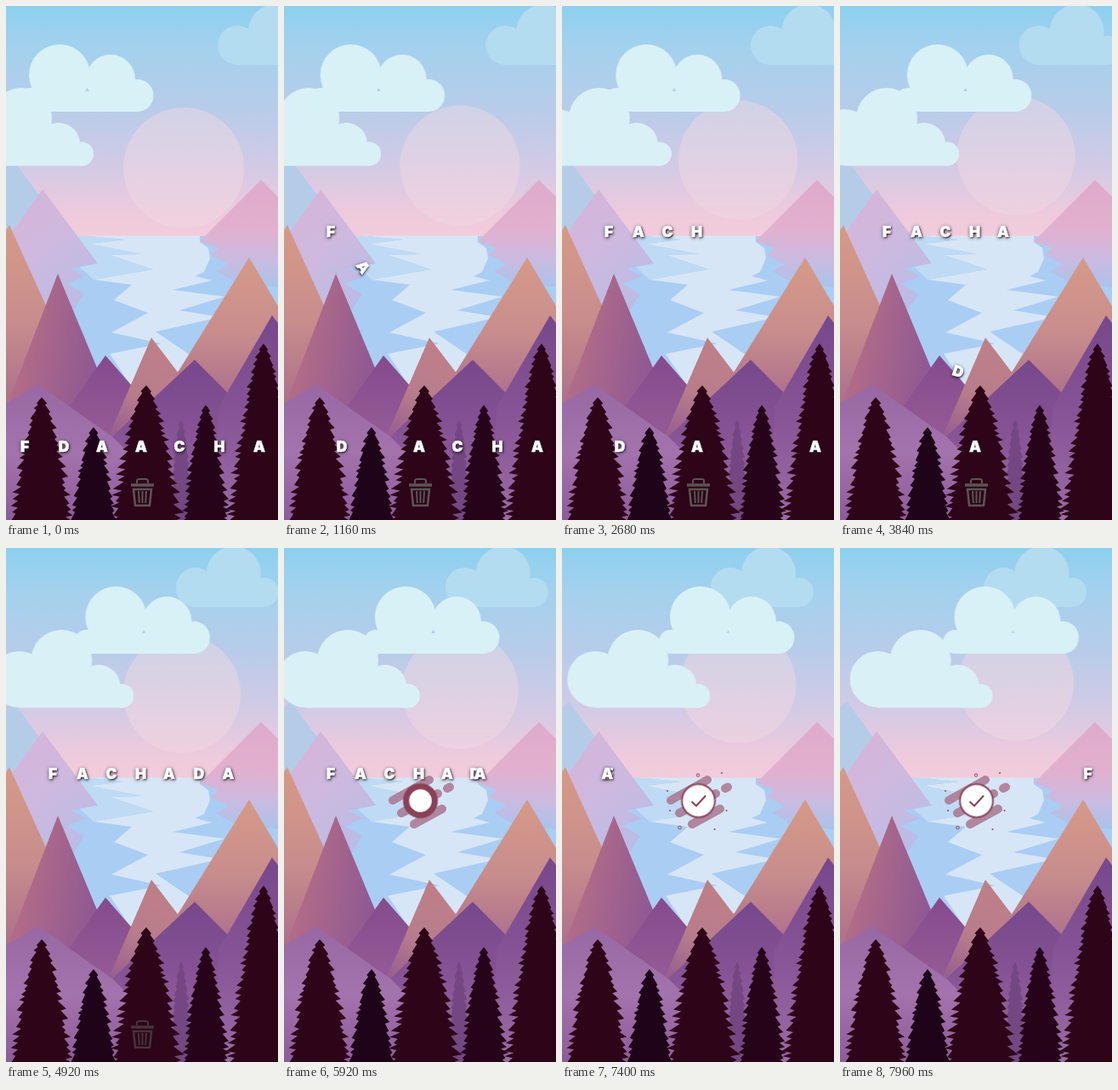
Recreate the animation shown at these times as an HTML page. Size 320 by 603 pixels, loop 8 s.

```html
<!DOCTYPE html>
<html lang="en">
<head>
<meta charset="utf-8">
<title>Letters over the lake</title>
<style>
html, body { margin: 0; width: 100%; height: 100%; overflow: hidden; }
#stage { position: relative; width: 320px; height: 603px; overflow: hidden; }
svg { position: absolute; left: 0; top: 0; }
.letter {
  position: absolute; left: -15px; top: -15px; width: 30px; height: 30px;
  font: 900 17.5px/30px Inter, "Open Sans", sans-serif;
  text-align: center; color: #fff; -webkit-text-stroke: .5px #fff;
  text-shadow: 1px 1px 2px #2b1c2b, 0 1px 4px #2b1c2bcc;
}
.drift { animation: drift 8s linear infinite; }
.dot, .streak { transform-box: fill-box; transform-origin: center; }
#sun { transform-origin: 206px 190px; animation: rise 8s linear infinite; }
#trash { animation: trash 8s infinite; }
#badge { animation: badge 8s infinite; }
#disc { animation: disc 8s infinite; }
#core { animation: core 8s infinite; }
#tick { stroke-dasharray: 30; animation: tick 8s infinite; }
.streak { animation: streak 8s infinite; }
.dot { animation: dot 8s infinite; }
@keyframes drift { to { transform: translateX(var(--dx)); } }
@keyframes rise {
  from { transform: translate(2px, 0); }
  14% { transform: translate(0, -2.5px) scale(.996); }
  to { transform: translate(0, -32px) scale(.958); }
}
@keyframes trash { 0%, 61% { opacity: 1; } 63%, 100% { opacity: 0; } }
@keyframes badge { 0%, 68.9% { visibility: hidden; } 69%, 100% { visibility: visible; } }
@keyframes disc {
  0%, 69% { transform: scale(0); animation-timing-function: ease-out; }
  73%, 100% { transform: scale(1); }
}
@keyframes core {
  0%, 71% { transform: scale(0); animation-timing-function: ease-out; }
  74% { transform: scale(.72); }
  77%, 100% { transform: scale(1); }
}
@keyframes streak {
  0%, 70% { transform: scale(0); animation-timing-function: ease-out; }
  74%, 100% { transform: scale(1); }
}
@keyframes tick { 0%, 77% { stroke-dashoffset: 30; } 81%, 100% { stroke-dashoffset: 0; } }
@keyframes dot {
  0%, 75% { transform: scale(0); animation-timing-function: ease-out; }
  80%, 100% { transform: scale(1); }
}
</style>
</head>
<body>
<div id="stage">
<svg width="320" height="603" viewBox="0 0 320 603">
  <defs>
    <linearGradient id="sky" x2="0" y2="1">
      <stop stop-color="#8dd0ef"/><stop offset=".18" stop-color="#a3d1ee"/>
      <stop offset=".45" stop-color="#b8cce9"/><stop offset=".7" stop-color="#d3cae5"/>
      <stop offset=".88" stop-color="#eccadd"/><stop offset="1" stop-color="#f3ccda"/>
    </linearGradient>
    <linearGradient id="sunFill" x2="0" y2="1">
      <stop stop-color="#ecd9e4" stop-opacity=".5"/><stop offset="1" stop-color="#efd5e1" stop-opacity=".62"/>
    </linearGradient>
    <linearGradient id="lilac" x2=".5" y2="1">
      <stop stop-color="#d9b3d8"/><stop offset=".55" stop-color="#cdb9df"/><stop offset="1" stop-color="#b9bce6"/>
    </linearGradient>
    <linearGradient id="rose" x2="0" y2="1">
      <stop stop-color="#dfaacb"/><stop offset=".45" stop-color="#e2b0cf"/>
      <stop offset=".75" stop-color="#c9bbe1"/><stop offset="1" stop-color="#a9c3ec"/>
    </linearGradient>
    <linearGradient id="amber" x2="0" y2="1">
      <stop stop-color="#d69a88"/><stop offset=".5" stop-color="#c88d8c"/><stop offset="1" stop-color="#a96b8c"/>
    </linearGradient>
    <linearGradient id="plum" x1="0" y1=".5" x2="1" y2=".8">
      <stop stop-color="#b76f84"/><stop offset=".45" stop-color="#a0628e"/><stop offset="1" stop-color="#845296"/>
    </linearGradient>
    <linearGradient id="orchid" x2="0" y2="1">
      <stop stop-color="#854a8c"/><stop offset="1" stop-color="#995f9a"/>
    </linearGradient>
    <linearGradient id="copper" x1=".6" x2=".3" y2="1">
      <stop stop-color="#bf7f87"/><stop offset=".5" stop-color="#b87d8b"/><stop offset="1" stop-color="#935a90"/>
    </linearGradient>
    <linearGradient id="violet" x2="0" y2="1">
      <stop stop-color="#76488b"/><stop offset=".4" stop-color="#845194"/><stop offset="1" stop-color="#9a6ba5"/>
    </linearGradient>
    <linearGradient id="mauve" x2="0" y2="1">
      <stop stop-color="#9868a4"/><stop offset=".5" stop-color="#a373ad"/><stop offset="1" stop-color="#8d5b9a"/>
    </linearGradient>
  </defs>

  <rect width="320" height="272" fill="url(#sky)"/>
  <circle id="sun" cx="207" cy="190" r="71" fill="url(#sunFill)"/>
  <path fill="#b5cce9" d="M0 188 L8 180 42 226 60 300 0 300Z"/>

  <g class="drift" style="--dx:-80px" fill="#b4dcf0">
    <circle cx="272" cy="46" r="23"/><circle cx="317" cy="30" r="32"/>
    <circle cx="353" cy="52" r="17"/><rect x="272" y="48" width="81" height="21"/>
  </g>
  <g class="drift" style="--dx:77px" fill="#d9f1f6">
    <circle cx="-32" cy="154" r="33"/><circle cx="18" cy="132" r="36"/>
    <circle cx="62" cy="162" r="25"/><circle cx="89" cy="173.500" r="14"/>
    <rect x="-32" y="165" width="121" height="22.500"/>
    <rect x="-20" y="145" width="70" height="40"/>
  </g>
  <g class="drift" style="--dx:108px" fill="#d8f1f7">
    <circle cx="28" cy="110" r="14"/><circle cx="63" cy="81" r="36"/>
    <circle cx="123" cy="86" r="29"/><circle cx="154.500" cy="105" r="19"/>
    <rect x="28" y="100" width="126" height="24"/>
  </g>

  <rect y="270" width="320" height="333" fill="#aacdf4"/>
  <path fill="#d7e6f6" d="M92 269.500 L228 269.500 228 277 238 284 240 296 233 312 223 317 242 322 196 333 257 341 204 357 252 365 176 382 216 409 204 428 170 445 146 444 122 408 183 396 124 383 167 360 127 345 148 327 103 321 173 309 122 292 161 291 98 279 140 274Z"/>
  <path fill="#bfdaf5" d="M62 269.500 L92 269.500 140 274 98 279 161 291 122 292 173 309 103 321 80 300Z"/>

  <path fill="url(#lilac)" d="M43 215 L108 302 76 308 94 317 72 326 92 338 68 375 0 375 0 275Z"/>
  <path fill="url(#rose)" d="M300 204 L320 224 320 330 270 324 247 311 262 303 241 292 250 284 228 276Z"/>
  <path fill="url(#amber)" d="M4 257 L60 380 30 480 0 480 0 263Z"/>
  <path fill="url(#amber)" d="M286 295 L320 352 320 470 190 470 200 433Z"/>
  <path fill="url(#plum)" d="M61 314 L126 470 126 520 0 520 0 472Z"/>
  <path fill="url(#orchid)" d="M117 410 L152 450 160 530 90 520 75 469Z"/>
  <path fill="url(#copper)" d="M171 389 L210 440 210 520 114 520Z"/>
  <path fill="url(#violet)" d="M222 415 L275 468 290 603 120 603 122 508Z"/>
  <path fill="url(#violet)" d="M313 363 L320 372 320 603 246 603 250 471Z"/>
  <path fill="url(#mauve)" d="M0 466 L38 444 126 506 160 540 165 603 0 603Z"/>
  <g id="trees"></g>

  <g id="trash" fill="none" stroke="#5c5453">
    <path d="M154 560 V557 Q154 555 157 555 H164 Q167 555 167 557 V560" stroke-width="2"/>
    <path d="M147 562 H174" stroke-width="3.500"/>
    <path d="M150 567 H171 L169 586 H152Z" stroke-width="2.500"/>
    <path d="M156 569 l.8 14 M160.500 569 v14 M165 569 l-.8 14" stroke-width="2"/>
  </g>

  <g id="badge">
    <g fill="none" stroke="#a7728b" stroke-opacity=".82" stroke-width="10" stroke-linecap="round">
      <path class="streak" d="M128 296 L171 272"/>
      <path class="streak" d="M138 311 L181 288"/>
      <path class="streak" d="M192 282 L195 280.500"/>
      <path class="streak" d="M153 324 L186 306"/>
    </g>
    <g fill="none" stroke="#8d4961" stroke-width="1">
      <circle class="dot" cx="160" cy="266.500" r="1.700"/>
      <circle class="dot" cx="138.500" cy="328" r="1.800"/>
    </g>
    <g id="dots" fill="#8d4961"></g>
    <g transform="translate(160.500 296.500)">
      <circle id="disc" r="20.500" fill="#8b4058"/>
      <circle id="core" r="18.500" fill="#fff"/>
      <path id="tick" d="M-8 1 L-2.500 6 L8.500 -6" fill="none" stroke="#8b4058" stroke-width="2"/>
    </g>
  </g>
</svg>
</div>
<script>
const LOOP = 8000, FLIGHT = 450, EXIT = 1000, EXIT_DX = 400;
const stage = document.getElementById('stage');

function svgEl(parent, tag, attrs) {
  const el = document.createElementNS('http://www.w3.org/2000/svg', tag);
  for (const k in attrs) el.setAttribute(k, attrs[k]);
  return parent.appendChild(el);
}

let seed = 7;
const rand = () => (seed = seed * 16807 % 2147483647) / 2147483647;

// Conifer outline: ragged, drooping branch tips that widen towards the ground
function tree(x, top, half, fill) {
  const side = dir => {
    const pts = [];
    for (let y = top + 5; y < 600; y += 6 + rand() * 6) {
      const w = half * Math.pow((y - top) / (603 - top), 0.6);
      pts.push([x + dir * (w * (0.92 + rand() * 0.2) + 1), y + 2]);
      pts.push([x + dir * w * (0.8 + rand() * 0.1), y + 4]);
    }
    return pts;
  };
  const pts = [[x, top], ...side(1), [x + half, 604],
    [x - half, 604], ...side(-1).reverse()];
  svgEl(trees, 'polygon', { points: pts.map(p => p.map(n => n.toFixed(1))).join(' '), fill });
}
const trees = document.getElementById('trees');
tree(206, 485, 14, '#744783');
tree(42, 459, 36, '#2d0418');
tree(103, 494, 27, '#1f0419');
tree(165, 445, 41, '#2d0418');
tree(235, 468, 27, '#270319');
tree(303, 396, 41, '#2d0418');

const dots = document.getElementById('dots');
for (const [cx, cy] of [[188, 264], [124, 285], [127, 308], [193.5, 308], [179.5, 330]])
  svgEl(dots, 'circle', { class: 'dot', cx, cy, r: 1 });

// glyph, starting x, slot x, lift-off time, exit time
const letters = [
  ['F', 22, 55, 160, 7463],
  ['A', 113, 90, 872, 7189],
  ['C', 204, 124, 1560, 6915],
  ['H', 251, 158.5, 2220, 6600],
  ['A', 298, 192, 3010, 6257],
  ['D', 68, 227, 3725, 5914],
  ['A', 159, 261.5, 4440, 5657]
].map(([glyph, x0, x1, fly, exit]) => {
  const el = document.createElement('div');
  el.className = 'letter';
  el.textContent = glyph;
  stage.append(el);
  return { el, x0, x1, fly, exit };
});

const clamp = p => Math.min(1, Math.max(0, p));
const bez = (a, b, u) => 3 * a * u * (1 - u) ** 2 + 3 * b * u * u * (1 - u) + u ** 3;

// Pulls back before shooting off
function backEase(p) {
  if (p <= 0 || p >= 1) return clamp(p);
  let lo = 0, hi = 1;
  for (let i = 0; i < 24; i++) {
    const mid = (lo + hi) / 2;
    if (bez(0.68, 0.265, mid) < p) lo = mid; else hi = mid;
  }
  return bez(-0.55, 1.55, lo);
}

let start;
function draw(now) {
  start ??= now;
  const t = (now - start) % LOOP;
  for (const l of letters) {
    const p = clamp((t - l.fly) / FLIGHT);
    const e = 1 - (1 - p) ** 2;
    const x = l.x0 + (l.x1 - l.x0) * e + EXIT_DX * backEase((t - l.exit) / EXIT);
    const y = 517 - 252 * e ** 1.3;
    const turn = 55 * Math.sin(Math.PI * p ** 1.6);
    l.el.style.transform = `translate(${x}px, ${y}px) rotate(${turn}deg)`;
  }
  requestAnimationFrame(draw);
}
requestAnimationFrame(draw);
</script>
</body>
</html>
```
